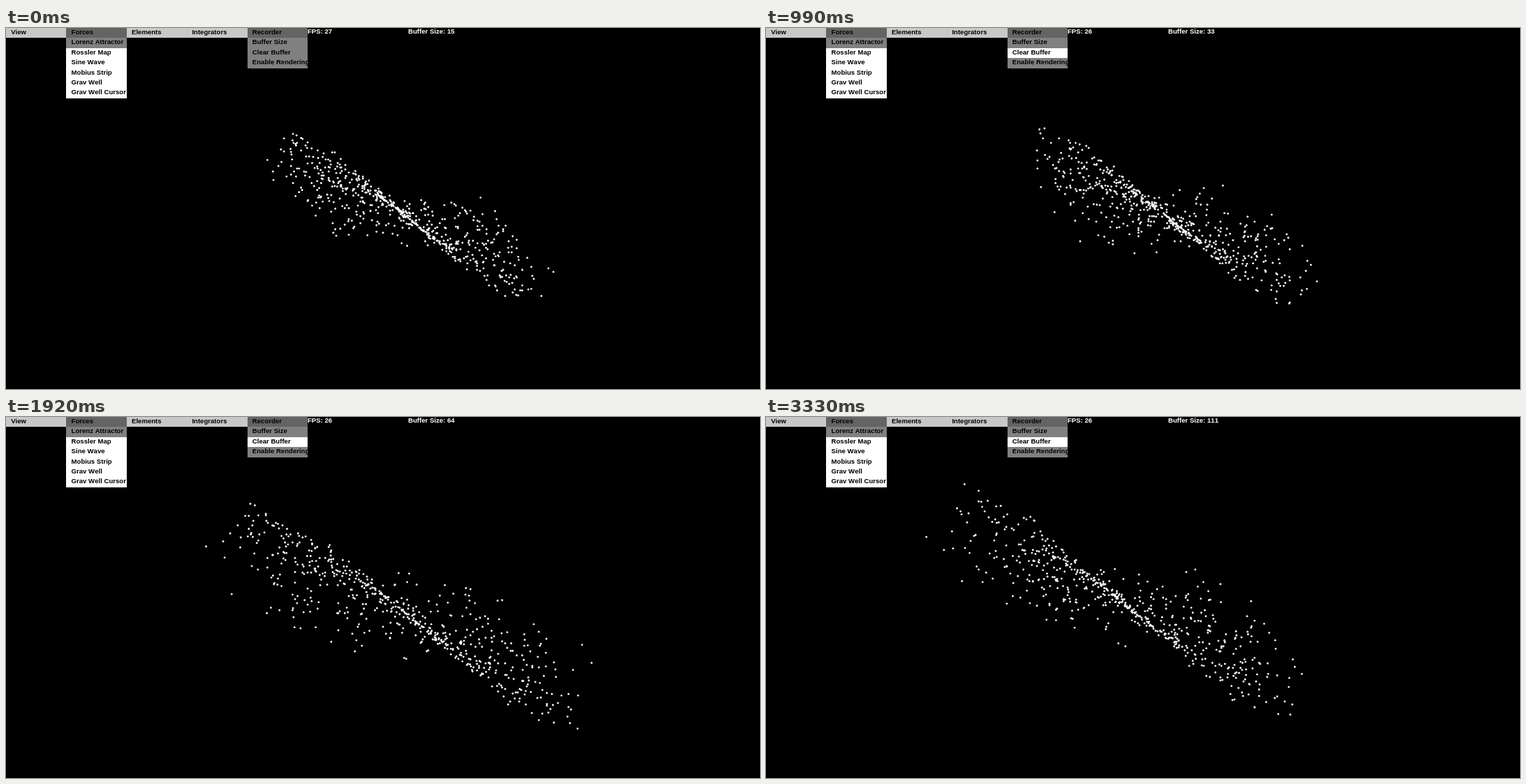
Write an HTML page with a canvas that moves like this. It is 1080 px wide and 518 px high and loops after 3.36 s.

```html
<!DOCTYPE html>
<html lang="en">
<head>
<meta charset="utf-8">
<title>Particle forces</title>
<style>
  html, body { margin: 0; width: 100%; height: 100%; overflow: hidden; background: #000; }
  body { position: relative; font: bold 9.6px/12.5px "Liberation Sans", Arial, sans-serif; font-kerning: none; }
  canvas { position: absolute; left: 0; top: 0; }
  .menu { position: absolute; top: 0; width: 86.4px; }
  .menu div {
    box-sizing: border-box; height: 14.4px; padding-left: 7.2px;
    overflow: hidden; white-space: nowrap; background: #fff; color: #000;
  }
  .menu .head { background: #c8c8c8; }
  .menu .open { background: #646464; }
  .menu .on { background: #808080; }
  .stat { position: absolute; top: 0; line-height: 9.4px; color: #fff; white-space: nowrap; }
</style>
</head>
<body>
<canvas id="stage" width="1080" height="518"></canvas>

<div class="menu" style="left:0"><div class="head">View</div></div>
<div class="menu" style="left:86.4px">
  <div class="open">Forces</div>
  <div class="on">Lorenz Attractor</div>
  <div>Rossler Map</div>
  <div>Sine Wave</div>
  <div>Mobius Strip</div>
  <div>Grav Well</div>
  <div>Grav Well Cursor</div>
</div>
<div class="menu" style="left:172.8px"><div class="head">Elements</div></div>
<div class="menu" style="left:259.2px"><div class="head">Integrators</div></div>
<div class="menu" style="left:345.6px">
  <div class="open">Recorder</div>
  <div class="on">Buffer Size</div>
  <div id="clear" class="on">Clear Buffer</div>
  <div class="on">Enable Rendering</div>
</div>
<div class="stat" id="fps" style="left:432px"></div>
<div class="stat" id="buffer" style="left:576px"></div>

<script>
const STEP = 30, STEPS = 112, COUNT = 600, UNIT = 0.72;
const SCALE_X = 11.4, SCALE_Y = 5.4;

const $ = id => document.getElementById(id);
const ctx = $('stage').getContext('2d');

// camera: step, centre x, centre y, zoom
const camera = [
  [0, 577, 273, 1], [43, 577, 273, 1], [58, 573, 281, 1.32], [64, 572, 281, 1.32],
  [76, 527, 277, 1.3], [86, 509, 269, 1.3], [111, 513, 268, 1.32]
];
const rates = [[0, 27], [30, 26], [38, 25], [50, 26], [85, 27], [98, 26]];

let seed = 20177;
function random() {
  seed = (seed + 0x6D2B79F5) | 0;
  let r = Math.imul(seed ^ (seed >>> 15), 1 | seed);
  r = (r + Math.imul(r ^ (r >>> 7), 61 | r)) ^ r;
  return ((r ^ (r >>> 14)) >>> 0) / 4294967296;
}

function lorenz(p, n) {
  const dt = 0.005;
  for (let i = 0; i < n; i++) {
    const [x, y, z] = p;
    p[0] += 10 * (y - x) * dt;
    p[1] += (x * (28 - z) - y) * dt;
    p[2] += (x * y - 8 / 3 * z) * dt;
  }
}

// every particle settles on the attractor, then its path is stored
const paths = Array.from({ length: COUNT }, () => {
  const p = [random() * 30 - 15, random() * 30 - 15, 10 + random() * 30];
  lorenz(p, 1500 + Math.floor(random() * 500));
  const path = new Float32Array(STEPS * 2);
  for (let s = 0; s < STEPS; s++) {
    path[s * 2] = p[0];
    path[s * 2 + 1] = p[1];
    lorenz(p, 2);
  }
  return path;
});

function viewAt(step) {
  let i = 0;
  while (i < camera.length - 2 && camera[i + 1][0] <= step) i++;
  const a = camera[i], b = camera[i + 1];
  const k = (step - a[0]) / (b[0] - a[0]);
  return a.map((v, j) => v + (b[j] - v) * k);
}

function draw(step) {
  const [, cx, cy, zoom] = viewAt(step);
  ctx.setTransform(1, 0, 0, 1, 0, 0);
  ctx.fillStyle = '#000';
  ctx.fillRect(0, 0, 1080, 518);
  ctx.setTransform(UNIT, 0, 0, UNIT, 0, 0);
  ctx.fillStyle = '#fff';
  ctx.beginPath();
  for (const path of paths) {
    const x = Math.round((cx + path[step * 2] * SCALE_X * zoom) / UNIT);
    const y = Math.round((cy + path[step * 2 + 1] * SCALE_Y * zoom) / UNIT);
    ctx.rect(x - 2, y - 1, 4, 2);
    ctx.rect(x - 1, y - 2, 2, 4);
  }
  ctx.fill();

  $('fps').textContent = 'FPS: ' + rates.filter(r => r[0] <= step).pop()[1];
  $('buffer').textContent = 'Buffer Size: ' + (step || 15);
  $('clear').className = step ? '' : 'on';
}

let start = null, shown = -1;
function tick(now) {
  if (start === null) start = now;
  const step = Math.floor((now - start) / STEP) % STEPS;
  if (step !== shown) draw(shown = step);
  requestAnimationFrame(tick);
}
draw(0);
requestAnimationFrame(tick);
</script>
</body>
</html>
```
